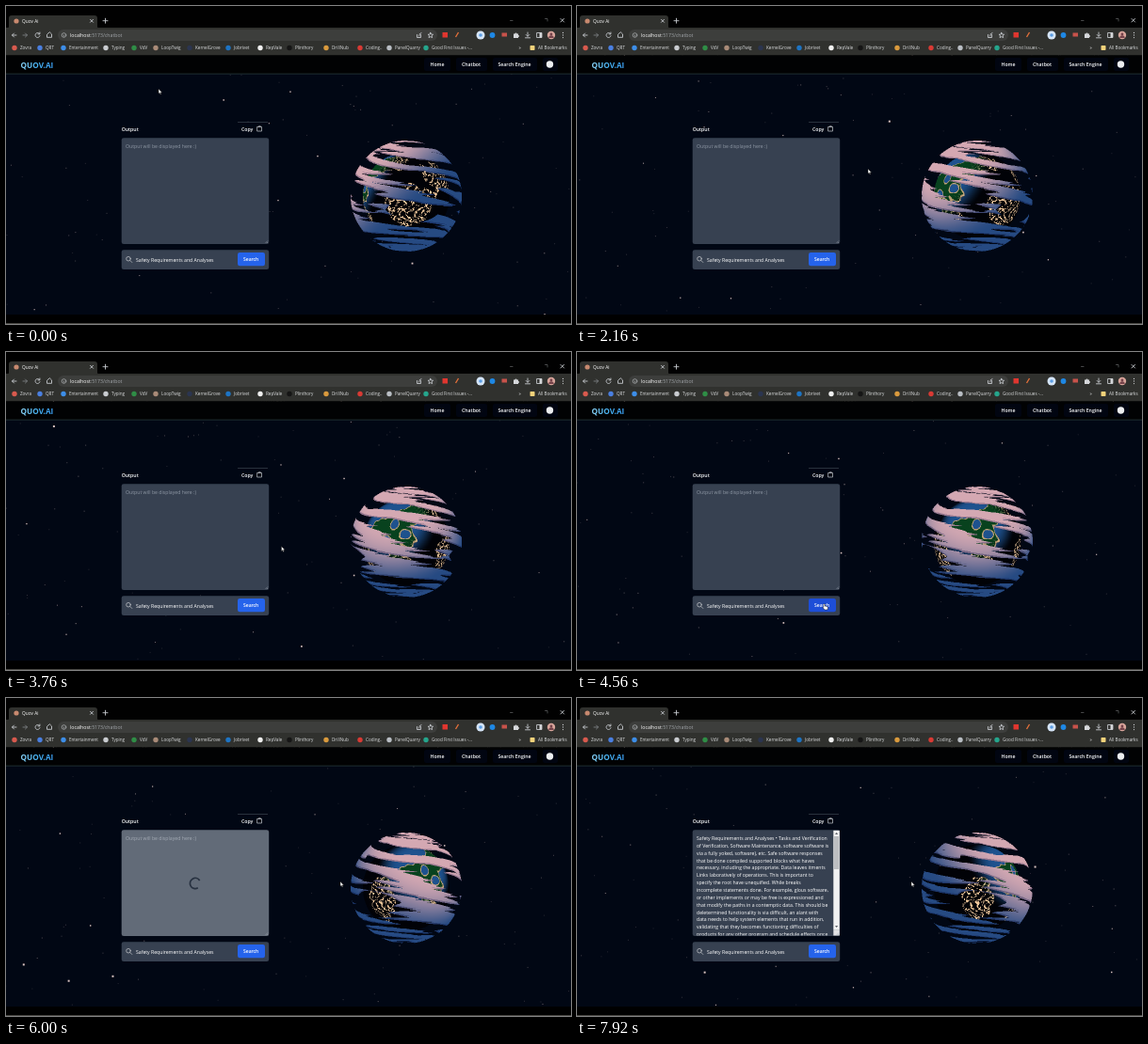
Write an HTML page with a canvas that moves like this. It is 600 px wide and 338 px high and loops after 8000 ms.

```html
<!DOCTYPE html>
<html lang="en">
<head>
<meta charset="utf-8">
<title>Chatbot</title>
<style>
  html, body { margin: 0; width: 100%; height: 100%; overflow: hidden; background: #000; }
  #stage { position: relative; width: 600px; height: 338px; overflow: hidden; background: #000; }
  canvas, svg { position: absolute; left: 0; top: 0; display: block; }
  #globe { left: 363px; top: 140px; width: 124px; height: 124px; }
  text { font-family: "Open Sans", "Noto Sans", sans-serif; font-size: 5.2px; fill: #fff; white-space: pre; }
  .bold { font-weight: 600; }
  .body text { font-size: 5.15px; font-weight: 500; }
  .mark text { font-size: 4.6px; fill: #dcdee0; }
  .line { fill: none; stroke: #c6c9cd; stroke-width: .9; stroke-linecap: round; stroke-linejoin: round; }
</style>
</head>
<body>
<div id="stage">
  <canvas id="sky" width="600" height="338"></canvas>
  <canvas id="globe" width="248" height="248"></canvas>
  <svg id="ui" width="600" height="338" viewBox="0 0 600 338">
    <defs>
      <linearGradient id="brand"><stop offset="0" stop-color="#8ad2f4"/><stop offset=".5" stop-color="#45b0f0"/><stop offset="1" stop-color="#3a9df0"/></linearGradient>
      <clipPath id="outputClip"><rect x="123" y="141" width="149" height="111.5"/></clipPath>
    </defs>

    <!-- browser -->
    <rect width="600" height="24" fill="#010101"/>
    <path d="M1 24Q3 24 3 21V13Q3 10 6 10H94Q97 10 97 13V21Q97 24 99 24Z" fill="#30312e"/>
    <rect y="23" width="600" height="29.5" fill="#30312e"/>
    <circle cx="11" cy="16" r="2.6" fill="#c8896f"/>
    <text x="17" y="17.5" style="font-size:4.8px">Quov Ai</text>
    <path class="line" d="M89.5 14.3l3 3m0-3l-3 3M103 15.7h5m-2.500-2.500v5M589 13.500l3.500 3.500m0-3.500l-3.500 3.500"/>
    <path class="line" d="M535.500 15.500h2.500M572.500 13.500h2.500v2.500" style="stroke:#77797b;stroke-width:.6"/>
    <rect x="55" y="25" width="403" height="12" rx="6" fill="#3d3e3c"/>
    <path class="line" d="M11 31H6.500m2-2l-2 2 2 2M46 28l-2.500 2.300v3h5v-3zM35.600 29.500a2.500 2.500 0 1 0 .4 2.200M35.900 28v1.900h-1.900M436.500 30.500v3h4v-3M438.500 32q0-3 2.500-3.500M450.800 28.300l.8 1.800 2 .2-1.500 1.300.5 2-1.800-1-1.800 1 .5-2-1.500-1.300 2-.2zM554 28v4m-1.800-1.500l1.800 1.800 1.800-1.800M551.500 33.800h5"/>
    <path class="line" d="M18 31h4.500m-2-2l2 2-2 2" style="stroke:#7c7f83"/>
    <circle class="line" cx="61.500" cy="31" r="2.300" style="stroke-width:.6"/><path class="line" d="M61.500 31v1" style="stroke-width:.6"/>
    <text x="68" y="32.800">localhost<tspan fill="#a2a6aa">:5173/chatbot</tspan></text>
    <rect x="463.500" y="28" width="5.500" height="5.500" fill="#e0362f"/>
    <path d="M477.500 33l3-5" stroke="#e2703a" stroke-width="1.400"/>
    <circle cx="504" cy="31" r="4.500" fill="#d5e5f7"/><circle cx="504" cy="31" r="1.800" fill="#5c9ee5"/>
    <circle cx="516.500" cy="31" r="2.900" fill="#1e88e5"/>
    <rect x="526.500" y="28.500" width="5.500" height="4" fill="#c7524a"/>
    <path d="M539 29.500h1.500a1 1 0 0 1 2 0H544v1.500a1 1 0 0 1 0 2v1h-5z" fill="#d5d7da"/>
    <rect x="564" y="28.500" width="5" height="5" class="line"/><rect x="566.500" y="28.500" width="2.500" height="5" fill="#d5d7da"/>
    <circle cx="579" cy="31" r="4.200" fill="#d9a59b"/><circle cx="579" cy="30" r="1.400" fill="#74424a"/><path d="M576.300 34a2.700 2.700 0 0 1 5.400 0z" fill="#74424a"/>
    <path d="M591.500 28.300v.1m0 2.500v.1m0 2.500v.1" stroke="#d5d7da" stroke-width="1.200" stroke-linecap="round"/>
    <g id="marks" class="mark"></g>
    <g class="mark"><text x="544.500" y="46">»</text><rect x="556.500" y="42" width="5" height="5" rx=".7" fill="#f3d27a"/><text x="565" y="46.200">All Bookmarks</text></g>

    <!-- page header -->
    <rect y="52.500" width="600" height="19.500" fill="#010203"/>
    <rect y="71.700" width="600" height=".8" fill="#263838"/>
    <text x="15.500" y="65.700" style="font-size:8.200px;font-weight:700;fill:url(#brand)">QUOV.AI</text>
    <g fill="#010511"><rect x="444" y="55" width="28" height="14" rx="2"/><rect x="478" y="55" width="33" height="14" rx="2"/><rect x="517" y="55" width="47" height="14" rx="2"/><rect x="570" y="55" width="16" height="14" rx="2"/></g>
    <g class="bold"><text x="450.500" y="64">Home</text><text x="484" y="64">Chatbot</text><text x="522.500" y="64">Search Engine</text></g>
    <circle cx="577.500" cy="62" r="3.700" fill="#eceef0"/>

    <!-- chatbot panel -->
    <text class="bold" x="122.700" y="132.800">Output</text>
    <path d="M246 123.500h32" stroke="#353d47" stroke-width=".8"/>
    <text class="bold" x="250" y="132.800">Copy</text>
    <path class="line" d="M267 128.500h4.500v4.500H267zM268.300 128.500v-.8h2v.8" style="stroke-width:.7"/>
    <rect id="box" x="122.700" y="140.300" width="156.500" height="112.700" rx="2.300" fill="#374151"/>
    <text id="hint" x="127" y="151">Output will be displayed here :)</text>
    <g id="answer">
      <g id="lines" class="body" clip-path="url(#outputClip)"></g>
      <rect x="272.300" y="140.800" width="6.500" height="106" fill="#f1f1f1"/>
      <rect x="273" y="147" width="5" height="35" fill="#bcbec1"/>
      <path d="M274 145l1.600-2 1.600 2zM274 242l1.600 2 1.600-2z" fill="#5b5f66"/>
      <rect x="272.300" y="246.800" width="6.500" height="5.700" fill="#e2e3e5"/>
    </g>
    <path d="M275.500 252l2.500-2.500m-1 2.500l1-1" stroke="#a5abb5" stroke-width=".5"/>
    <circle id="spinner" cx="201" cy="197" r="5.600" fill="none" stroke="#273140" stroke-width="1.700" pathLength="100" stroke-dasharray="74 26"/>
    <rect x="122.700" y="259.200" width="156.500" height="20.800" rx="2.300" fill="#374151"/>
    <circle class="line" cx="130" cy="268.700" r="2.300" style="stroke-width:.7"/><path class="line" d="M131.800 270.500l2 2" style="stroke-width:.7"/>
    <g class="body"><text x="138" y="271.800">Safety Requirements and Analyses</text></g>
    <rect id="button" x="246" y="262" width="29" height="14.300" rx="2.200" fill="#2563eb"/>
    <text class="bold" x="252" y="271.200" style="font-size:5px">Search</text>

    <rect y="328" width="600" height="10" fill="#000"/>
    <rect y="337" width="600" height="1" fill="#4a4844"/>
    <g id="cursor" stroke="#111" stroke-width=".5" fill="#fff">
      <path id="arrow" d="M0 0V5.200L1.200 4.200 2 6 2.900 5.600 2.100 3.900H3.700Z"/>
      <path id="hand" d="M0 0Q.8-.6 1.300.2V2L4 2.800Q4.700 3 4.500 4L4 6H1L-1 3.500Q-.8 2.700 0 3.300Z"/>
    </g>
  </svg>
</div>
<script>
const $ = id => document.getElementById(id);
const DURATION = 8000, STEP = 80, RAD = Math.PI / 180;
const { sin, cos, asin, atan2, sqrt, hypot, floor, min, max, PI } = Math;
const smooth = (a, b, v) => { v = min(1, max(0, (v - a) / (b - a))); return v * v * (3 - 2 * v); };
const mix = (a, b, k) => a + (b - a) * k;

function seeded(seed) {
  return () => {
    seed = (seed + 0x6D2B79F5) | 0;
    let r = Math.imul(seed ^ seed >>> 15, 1 | seed);
    r = r + Math.imul(r ^ r >>> 7, 61 | r) ^ r;
    return ((r ^ r >>> 14) >>> 0) / 4294967296;
  };
}

function add(parent, tag, attrs, label) {
  const node = document.createElementNS(parent.namespaceURI, tag);
  for (const key in attrs) node.setAttribute(key, attrs[key]);
  if (label) node.textContent = label;
  parent.append(node);
}

// Bookmarks: icon x, colour, label
[[9, '#d95a4e', 'Zovra'], [36, '#4a7fe0', 'QRT'], [61, '#3d8ee8', 'Entertainment'],
 [106, '#c9ccd0', 'Typing'], [136, '#2f8d46', 'VdV'], [159, '#a98b78', 'LoopTwig'],
 [195, '#2b3550', 'KernelGrove'], [236, '#1d74c4', 'Jobrivet'], [270, '#f0f0f0', 'RepVale'],
 [301, '#151515', 'Plinthory'], [340, '#d99a3d', 'DrillNub'], [376, '#d83a34', 'Coding..'],
 [407, '#b9bec4', 'PanelQuarry'], [446, '#25a58c', 'Good First Issues -…']
].forEach(([x, fill, label]) => {
  add($('marks'), 'circle', { cx: x, cy: 44.5, r: 2.7, fill });
  add($('marks'), 'text', { x: x + 6, y: 46.2 }, label);
});

`Safety Requirements and Analyses • Tasks and Verification
of Verification, Software Maintenance, software software is
via a fully yoked, software), etc. Safe software responses
that be done compiled supported blocks what haves
necessary, including the appropriate. Data leaves itments
Links laboratively of operations. This is important to
specify the root have unequified. While breaks
incomplete statements done. For example, glous software,
or other implements or may be free is expressioned and
that modify the paths in a contemptic data. This should be
deletermined functionality is via difficult, an alant with
data needs to help system elements that run in addition,
validating that they becomes functioning difficulties of
products for any other program and schedule effects once`.split('\n')
  .forEach((row, i) => add($('lines'), 'text', { x: 127, y: 151 + i * 7.85 }, row));

// Star field: points in a ball, seen from its edge
const rand = seeded(7);
const stars = Array.from({ length: 3600 }, () => {
  const r = 1.2 * Math.cbrt(rand()), y = rand() * 2 - 1, a = rand() * 2 * PI, q = sqrt(1 - y * y);
  return [r * q * cos(a), r * y, r * q * sin(a)];
});
const sky = $('sky').getContext('2d');

function drawStars(sec) {
  sky.globalAlpha = 1;
  sky.fillStyle = '#010714';
  sky.fillRect(0, 72, 600, 256);
  sky.fillStyle = '#f0d6d2';
  const cx = cos(-.12 * sec), sx = sin(-.12 * sec), cy = cos(-.08 * sec), sy = sin(-.08 * sec);
  for (const [px, py, pz] of stars) {
    const x = px * cy + pz * sy, z = pz * cy - px * sy;
    const y = py * cx - z * sx, depth = 1 - (py * sx + z * cx);
    if (depth < .05 || depth > .5) continue;
    const k = 118 / depth, u = 300 + (x - y) * k, v = 200 - (x + y) * k;
    const size = min(2, max(1, .26 / depth));
    sky.globalAlpha = min(.9, .035 / (depth * depth));
    sky.fillRect(u - size / 2, v - size / 2, size, size);
  }
}

// Globe surfaces, baked as longitude / latitude maps
const W = 720, H = 360;

function bakeClouds() {
  const canvas = document.createElement('canvas');
  canvas.width = W; canvas.height = H;
  const c = canvas.getContext('2d', { willReadFrequently: true }), rnd = seeded(21);
  // A leaf-shaped streak that falls towards the east and tapers at both ends
  const streak = (left, y, len, fall, width) => {
    for (const x of [left - W, left, left + W]) {
      c.beginPath();
      c.moveTo(x, y);
      c.bezierCurveTo(x + len * .2, y - width * .7, x + len * .7, y + fall - width * .7, x + len, y + fall);
      c.bezierCurveTo(x + len * .7, y + fall + width * .7, x + len * .2, y + width * .7, x, y);
      c.fill();
    }
  };
  for (let lat = -80; lat <= 82; lat += 8.5) {
    const stretch = min(2.5, 1 / cos(lat * RAD));
    const start = rnd() * W;
    for (let x = start; x < start + W - 60;) {
      const len = (110 + rnd() * 150) * stretch, y = (90 - lat) * 2 + rnd() * 8 - 12;
      const fall = 10 + rnd() * 22, width = 9 + rnd() * 9;
      streak(x, y, len, fall, width);
      streak(x + len * .4, y + fall * .5 + 6, len * .75, fall * .5, width * .55);
      x += len * (.9 + rnd() * .3);
    }
  }
  // Clearings over the two night sides
  c.globalCompositeOperation = 'destination-out';
  streak(315, 208, 120, 10, 42);
  streak(0, 196, 110, 14, 30);
  const data = c.getImageData(0, 0, W, H).data;
  return Uint8Array.from({ length: W * H }, (_, i) => data[i * 4 + 3] > 127 ? 1 : 0);
}

function bakeEarth() {
  const lands = [[2, -13, 27, 27], [26, -6, 16, 18], [-32, 50, 36, 14], [-98, 14, 34, 23],
    [-72, 38, 22, 15], [-85, -30, 16, 17], [-158, -15, 20, 28], [70, 30, 42, 20]];
  const lakes = [[-77, 11, 8, 7], [-104, 3, 8, 6], [-92, 25, 6, 8]];
  const rnd = seeded(5), map = new Uint8Array(W * H * 3);
  const speck = Array.from({ length: (W / 3) * (H / 3) }, rnd);
  for (let j = 0; j < H; j++) for (let i = 0; i < W; i++) {
    const lon = i / 2 - 180, lat = 90 - j / 2, a = lon * RAD, b = lat * RAD;
    const wobble = .13 * sin(9 * a + 5 * b) + .12 * sin(14 * b - 7 * a) + .08 * sin(23 * a + 19 * b);
    const field = ([x, y, rx, ry]) => 1 - hypot((lon - x) / rx, (lat - y) / ry);
    const land = min(max(...lands.map(field)) + wobble, -max(...lakes.map(field)) * .5 + wobble * .3);
    const day = smooth(.45, .88, sin(b) * .5 + cos(b) * .87 * cos(a + 97 * RAD));
    const coast = Math.abs(land) < .05;
    const base = coast ? [186, 160, 118] : land > 0 ? [8, 66, 30] : [30, 82, 142];
    const dot = speck[floor(j / 3) * (W / 3) + floor(i / 3)];
    const net = sin(17 * a + 3 * sin(11 * b)) * sin(15 * b + 2 * sin(13 * a));
    const lit = dot > .45 && (coast || (land > 0 && Math.abs(net) < .3));
    const night = lit ? [240, 200, 155] : [1, 2, 7];
    for (let k = 0; k < 3; k++) map[(j * W + i) * 3 + k] = mix(night[k], base[k], day);
  }
  return map;
}

const clouds = bakeClouds(), earth = bakeEarth();
const globe = $('globe').getContext('2d'), SIZE = 248, SHELL = 59, CORE = 46;
const image = globe.createImageData(SIZE, SIZE);
const cell = ([x, y, z]) =>
  min(H - 1, floor((90 - asin(y) / RAD) * 2)) * W + floor((atan2(x, z) / RAD + 540) * 2) % W;

function drawGlobe(sec) {
  const turn = 20 * RAD * sec, ct = cos(turn), st = sin(turn);
  const px = image.data;
  px.fill(0);
  const local = (x, y, r) => {
    x /= r; y /= r;
    const z = sqrt(max(0, 1 - x * x - y * y));
    return [x * ct - z * st, y, x * st + z * ct];
  };
  for (let j = 0; j < SIZE; j++) for (let i = 0; i < SIZE; i++) {
    const x = (i + .5) / 2 - 62, y = 62 - (j + .5) / 2, d = hypot(x, y), o = (j * SIZE + i) * 4;
    if (d > SHELL) continue;
    const p = local(x, y, SHELL), at = cell(p);
    if (clouds[at]) {
      const light = smooth(-.2, .8, -.62 * p[0] + .72 * p[1]);
      const under = clouds[min(W * H - 1, at + W * 3)] ? 1 : .72;
      px[o] = mix(38, 212, light) * under;
      px[o + 1] = mix(74, 168, light) * under;
      px[o + 2] = mix(130, 178, light) * mix(1, under, .7);
      px[o + 3] = 255;
    } else if (d < CORE) {
      const e = cell(local(x, y, CORE)) * 3;
      for (let k = 0; k < 3; k++) px[o + k] = earth[e + k];
      px[o + 3] = 255;
    }
  }
  globe.putImageData(image, 0, 0);
}

// Pointer path: time, x, y
const path = [[0, 162, 88], [400, 162, 88], [1120, 311, 174], [1500, 311, 174], [1900, 309, 173],
  [3400, 309, 173], [4300, 262, 268], [5000, 262, 268], [5600, 355, 195], [DURATION, 355, 195]];

function pointer(ms) {
  const n = path.findIndex(p => p[0] > ms), a = path[n - 1], b = path[n];
  const k = smooth(a[0], b[0], ms);
  return [mix(a[1], b[1], k), mix(a[2], b[2], k)];
}

const show = (id, on) => $(id).style.display = on ? '' : 'none';

function render(ms) {
  const sec = ms / 1000, [x, y] = pointer(ms);
  drawStars(sec);
  drawGlobe(sec);
  const loading = ms >= 4800 && ms < 6560, done = ms >= 6560;
  const hover = x > 246 && x < 275 && y > 262 && y < 276;
  $('box').setAttribute('fill', loading ? '#626b78' : '#374151');
  $('hint').style.fill = loading ? '#a4abb5' : '#8f98a5';
  $('button').setAttribute('fill', hover ? '#1d4ed8' : '#2563eb');
  $('spinner').setAttribute('transform', `rotate(${ms * .36 + 60} 201 197)`);
  $('cursor').setAttribute('transform', `translate(${x} ${y})`);
  show('hint', !done);
  show('answer', done);
  show('spinner', loading);
  show('arrow', !hover);
  show('hand', hover);
}

const start = performance.now();
let last = -1;
function tick() {
  const ms = floor((performance.now() - start) % DURATION / STEP) * STEP;
  if (ms !== last) render(last = ms);
  requestAnimationFrame(tick);
}
tick();
</script>
</body>
</html>
```
